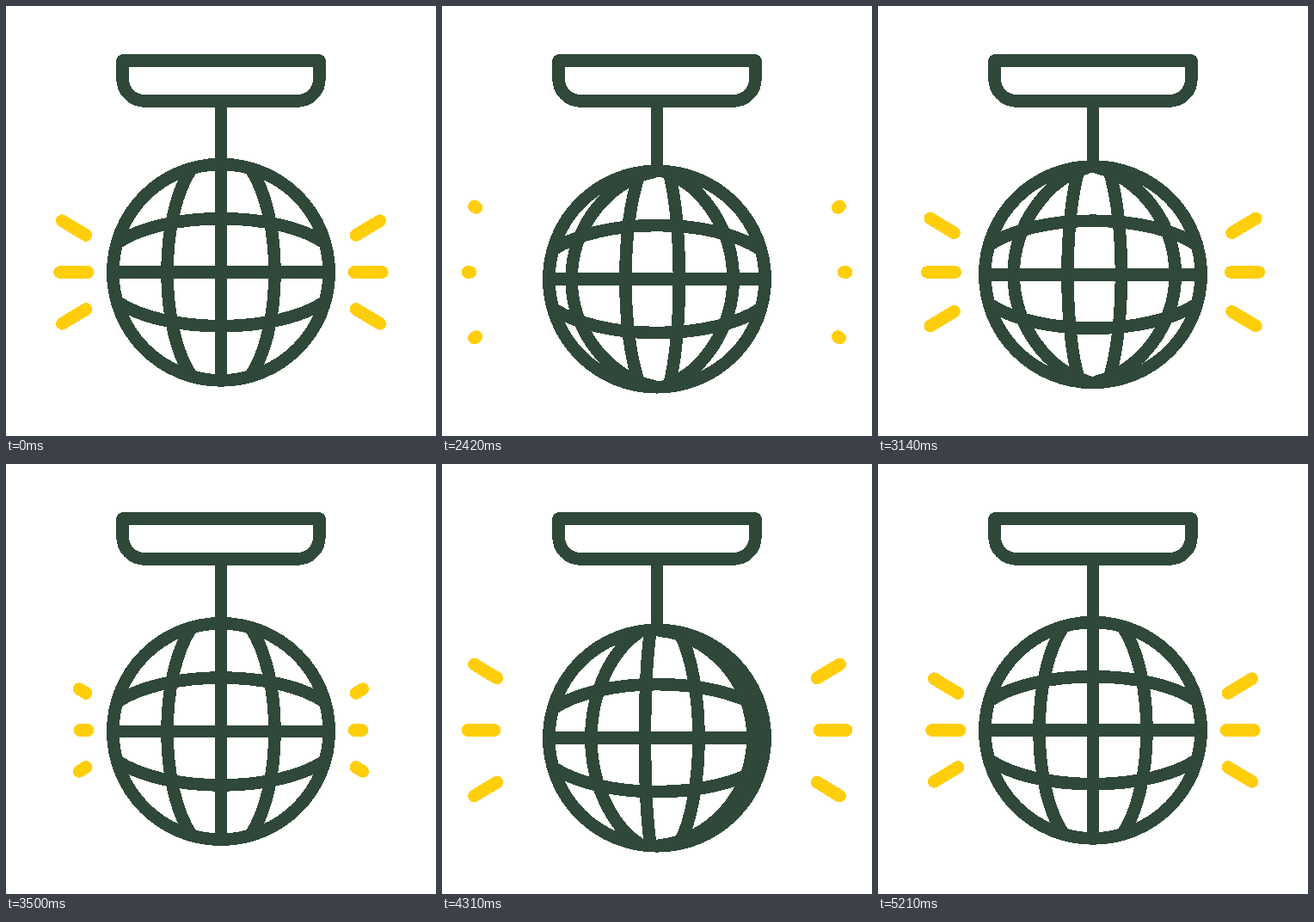
These frames come from a looping animation (500x500 px, 5.24 s). An HTML page:

```html
<!DOCTYPE html>
<html lang="en">
<head>
<meta charset="utf-8">
<title>Disco ball</title>
<style>
  html, body { margin: 0; width: 100%; height: 100%; overflow: hidden; background: #fff; }
  svg { display: block; width: 100vw; height: 100vh; shape-rendering: crispEdges; }
  path, circle { fill: none; stroke-width: 14.6; stroke-linecap: round; stroke-linejoin: round; }
  .frame { stroke: #2f4839; }
  .rays { stroke: #ffce0a; }
</style>
</head>
<body>
<svg viewBox="0 0 500 500">
  <g class="rays" id="rays"></g>
  <g class="frame">
    <path d="M135.5 63.5H364.5V84.5A26 26 0 0 1 338.5 110.5H161.5A26 26 0 0 1 135.5 84.5Z"/>
    <path id="rod"/>
    <g id="ball">
      <circle r="125.7"/>
      <path d="M-125.7 0H125.7"/>
    </g>
  </g>
</svg>
<script>
const LOOP = 5240, HOLD = 2030, STEP = 30, LAST = 107;
const GAP = 62.5, RADIUS = 125.7, BASE_Y = 309.7;

const $ = id => document.getElementById(id);
const lerp = (a, b, u) => a + (b - a) * u;
const clamp = (v, lo, hi) => Math.min(hi, Math.max(lo, v));
const ease = u => (1 - Math.cos(Math.PI * u)) / 2;

function addPath(parent) {
  const path = document.createElementNS('http://www.w3.org/2000/svg', 'path');
  return parent.appendChild(path);
}

// Eased interpolation through [step, value] pairs.
function track(keys, n) {
  for (let i = 1; i < keys.length; i++) {
    const [n0, v0] = keys[i - 1], [n1, v1] = keys[i];
    if (n <= n1) return lerp(v0, v1, ease((n - n0) / (n1 - n0)));
  }
  return keys[keys.length - 1][1];
}

// Half curves from rim to equator, by distance from the centre in gaps.
const BOWS = [
  { at: 0, points: [[0, 125], [0, 97], [0, 49], [0, 0]] },
  { at: 1, points: [[34, 121], [52, 94.5], [GAP, 49], [GAP, 0]] },
  { at: 1.5, points: [[6, 124], [52, 112], [94, 60], [94, 0]] },
  { at: 2, points: [[0, RADIUS], [69.4, RADIUS], [RADIUS, 69.4], [RADIUS, 0]] }
];

function gridLine(offset, swap) {
  const side = Math.sign(offset) || 1;
  const k = Math.min(2, Math.abs(offset) / GAP);
  const next = BOWS.findIndex(bow => bow.at > 0 && k <= bow.at);
  const a = BOWS[next - 1], b = BOWS[next];
  const u = (k - a.at) / (b.at - a.at);
  const half = a.points.map(([x, y], j) => [
    side * lerp(x, b.points[j][0], u),
    -lerp(y, b.points[j][1], u)
  ]);
  const mirrored = half.slice(0, 3).reverse().map(([x, y]) => [x, -y]);
  const [start, ...rest] = [...half, ...mirrored]
    .map(([x, y]) => (swap ? [y, x] : [x, y]).map(v => v.toFixed(2)).join(' '));
  return `M${start}C${rest.join(' ')}`;
}

for (const side of [-1, 1]) addPath($('ball')).setAttribute('d', gridLine(side * GAP, true));
const meridians = [-2, -1, 0, 1, 2].map(m => ({ m, path: addPath($('ball')) }));

const rays = [];
for (const [x0, y0, x1, y1] of [
  [93, 266.4, 37.5, 233],
  [95.2, 309.5, 30, 309.5],
  [93, 352.6, 37.5, 386]
]) {
  rays.push({ ends: [x0, y0, x1, y1], path: addPath($('rays')) });
  rays.push({ ends: [500 - x0, y0, 500 - x1, y1], path: addPath($('rays')) });
}

const DROP = [[0, 0], [22.5, 11.4], [45, 0], [68, 11.4], [97, 0]];
const SWING = [[0, 0], [21, -48.8], [79, 48.8], [107, 0]];

// Leading end of a ray; its tail follows half a length behind.
function rayHead(n) {
  const first = 14.4, cycle = 17, settle = first + 4 * cycle;
  if (n < first) return 0.5 + (n / first) ** 1.5;
  if (n < settle) return 1.5 * ((n - first) % cycle) / cycle;
  return 0.5 * (1 - (1 - (n - settle) / (LAST - settle)) ** 3);
}

function draw(time) {
  const t = time % LOOP;
  const n = t < HOLD ? 0 : Math.min(LAST, Math.floor((t - HOLD) / STEP) + 1);

  const y = BASE_Y + track(DROP, n);
  $('ball').setAttribute('transform', `translate(250 ${y.toFixed(2)})`);
  $('rod').setAttribute('d', `M250 110.5V${(y - RADIUS).toFixed(2)}`);

  const turn = track(SWING, n);
  for (const { m, path } of meridians) path.setAttribute('d', gridLine(m * GAP + turn, false));

  const head = rayHead(n);
  const from = clamp(head - 0.5, 0, 1), to = clamp(head, 0, 1);
  for (const { ends: [x0, y0, x1, y1], path } of rays) {
    const at = u => `${lerp(x0, x1, u).toFixed(2)} ${lerp(y0, y1, u).toFixed(2)}`;
    path.setAttribute('d', `M${at(from)}L${at(to)}`);
  }
}

const begin = performance.now();
function tick() {
  draw(performance.now() - begin);
  requestAnimationFrame(tick);
}
tick();
</script>
</body>
</html>
```
